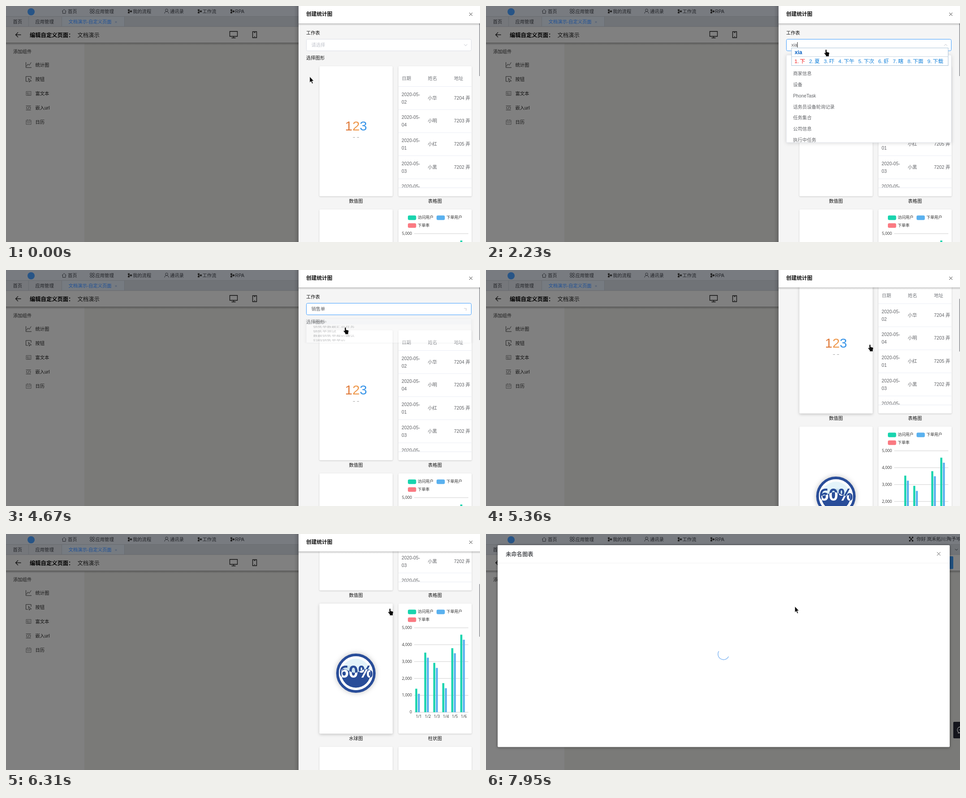
Animation of 1058x529 px, one loop 8000 ms. Source, as an HTML page:

```html
<!DOCTYPE html>
<html lang="zh-CN">
<head>
<meta charset="utf-8">
<style>
  html, body { margin: 0; width: 100%; height: 100%; overflow: hidden; background: #777; }
  svg { display: block; width: 1058px; height: 529px; }
  text { font-family: "Liberation Sans", "Noto Sans CJK SC", "Noto Sans CJK", sans-serif; white-space: pre; }
  .axis text { font-family: "Open Sans", "Noto Sans CJK SC", "Noto Sans CJK", sans-serif; }
  .card { filter: drop-shadow(0 1px 1.5px rgba(0,0,0,.18)); }
  .card.hover { filter: drop-shadow(0 2px 3px rgba(0,0,0,.2)); }
  .popup { filter: drop-shadow(0 1px 4px rgba(0,0,0,.14)); }
</style>
</head>
<body>
<svg id="stage" viewBox="0 0 1058 529"></svg>
<script>
const LOOP = 8000;
const BODY = 10.3;
const BLUE = '#294d99';

const text = (x, mid, s, { size = BODY, fill = '#111', weight = 400, anchor = 'start', extra = '' } = {}) =>
  `<text x="${x}" y="${mid + size * 0.37}" font-size="${size}" fill="${fill}" font-weight="${weight}" text-anchor="${anchor}" ${extra}>${s}</text>`;
const rect = (x, y, w, h, fill, extra = '') =>
  `<rect x="${x}" y="${y}" width="${w}" height="${h}" fill="${fill}" ${extra}/>`;
const line = (d, stroke = '#222', width = 1) =>
  `<path d="${d}" fill="none" stroke="${stroke}" stroke-width="${width}"/>`;
const ring = (x, y, r, stroke, width = 0.9) =>
  `<circle cx="${x}" cy="${y}" r="${r}" fill="none" stroke="${stroke}" stroke-width="${width}"/>`;
const cross = (x, y, r, color, width = 1) =>
  line(`M${x - r} ${y - r}l${2 * r} ${2 * r}m0 ${-2 * r}l${-2 * r} ${2 * r}`, color, width);

// Last key whose time has passed
const held = (keys, t) => keys.reduce((last, key) => (key[0] <= t ? key : last), keys[0]);
const ease = p => p * p * (3 - 2 * p);

function flowIcon(x) {
  return rect(x, 7.5, 4, 3.5, '#222') + rect(x, 13, 4, 3.5, '#222') +
    `<circle cx="${x + 7}" cy="12" r="2.2" fill="#222"/>` + line(`M${x + 2} 10v4M${x + 2} 12h5`);
}

function navBar() {
  const ink = '#202226';
  const items = [[138, '首页'], [199.5, '应用管理'], [283, '我的流程'], [366, '通讯录'], [438.5, '工作流'], [511.5, 'RPA']];
  return rect(0, 0, 1058, 24, '#787b80') +
    rect(0, 24, 1058, 22, '#707377') +
    rect(0, 24, 124, 22, '#75777b') + rect(125, 24, 139, 22, '#767b81') +
    line('M0 23.5H1058M0 46H1058M50.5 24V46M124.5 24V46M264.5 24V46', '#686b70') +
    '<circle cx="56" cy="13" r="8" fill="#275486"/>' +
    line('M125 12l4.7-4.5 4.7 4.5M126.5 11v5.5h6.4V11', ink, 0.9) +
    [[189.7, 9], [195.2, 9], [189.7, 14.5], [195.2, 14.5]].map(([x, y]) => ring(x, y, 2.2, ink)).join('') +
    [272, 428, 501].map(flowIcon).join('') +
    ring(358.5, 9.5, 2.8, ink) + line('M354 16.7q0-4.2 4.5-4.2t4.5 4.2', ink, 0.9) +
    items.map(([x, s]) => text(x, 11.7, s, { fill: ink })).join('') +
    line('M945 7l8 9M953 7l-8 9M945 9.5V7h2.5M950.5 7H953v2.5M953 13.5V16h-2.5M947.5 16H945v-2.5', '#111', 1.3) +
    text(961, 11.5, '你好 岚禾拓川:陶予岑', { fill: ink }) +
    text(15.5, 35, '首页', { fill: ink }) + text(65.5, 35, '应用管理', { fill: ink }) +
    text(139.5, 35, '文档演示-自定义页面', { fill: '#1d4f96' }) + cross(245.5, 36, 2, '#3f5570', 0.8) +
    line('M1033 31q3 4 0 8M1047 33.5l3 3 3-3', ink);
}

function sidebar() {
  const tools = ['统计图', '按钮', '富文本', '嵌入url', '日历'];
  return text(16, 102.5, '添加组件', { fill: '#1a1a1a' }) +
    line('M44.5 126v12h12.5M46 135l3-5 2.7 3 4.5-6.5') +
    line('M49 169h-4.5v-11h11.5v5M50 162l6.5 6-3 .3-1.5 2.5z') +
    line('M45 191.5h11v9H45zM47 194h3v3h-3zM52 194h2.5M52 196.5h2.5M47 199h7.5', '#484848') +
    line('M44.5 224h11M44.5 233h11M47.5 226.5l-2.5 2 2.5 2M53 226.5l2.5 2-2.5 2M51.5 226l-2.5 5') +
    line('M45 256h11v9.5H45zM45 259h11M48 254v3M53 254v3M47 262h7', '#444', 0.9) +
    tools.map((s, i) => text(65.5, 132 + 32 * i, s)).join('');
}

function page() {
  return rect(0, 0, 1058, 529, '#7a7a78') + rect(0, 84, 175, 445, '#808080') + navBar() +
    rect(0, 47, 1058, 35, '#808080') + rect(0, 82, 1058, 6, 'url(#dimShade)') +
    rect(960, 50, 83, 28.5, '#20507f', 'rx="2"') +
    line('M33.5 64.5H21.5M27 59l-5.5 5.5 5.5 5.5', '#111', 1.3) +
    text(53, 65, '编辑自定义页面：', { size: 12.3, weight: 700, fill: '#000' }) +
    text(159.5, 65, '文档演示', { size: 12.3 }) +
    line('M499.5 57h17v11h-17zM508 68v3M503.5 71.5h9', '#111', 1.3) +
    line('M550.5 57.5h9v13.5h-9zM553.5 59.5h3M554 68.7h2', '#111', 1.3) +
    sidebar() +
    rect(1043, 421, 20, 37, '#14151c', 'rx="2"') +
    ring(1058.5, 439, 6.5, '#8b8b8b', 1.3) + line('M1055.5 439h2M1053 446h4', '#8b8b8b', 1.3);
}

const card = (x, y, id, inner) =>
  rect(x, y, 163.5, 291.5, '#fff', `rx="2" class="card" id="${id}"`) + inner;

function numberCard() {
  const digits = [['1', '#e07a3a'], ['2', '#ef994c'], ['3', '#3995e8']];
  return digits.map(([s, fill], i) =>
    `<text x="${756.8 + i * 16.35}" y="279" font-size="29.4" fill="${fill}">${s}</text>`).join('') +
    line('M774.5 294.5h4.5M783.5 294.5h4.5', '#a3a3a3', 1.2);
}

function tableCard() {
  const rows = [['02', '小华', '7204 弄'], ['04', '小明', '7203 弄'], ['01', '小红', '7205 弄'], ['03', '小黑', '7202 弄']];
  const soft = { fill: '#606266' }, head = { fill: '#74777c', weight: 500 };
  const top = i => 180.5 + 51.7 * i;
  return ['日期', '姓名', '地址'].map((s, i) => text(883.5 + 58.2 * i, 162.5, s, head)).join('') +
    rows.map(([day, name, place], i) =>
      text(883, top(i) + 17.3, '2020-05-', soft) + text(883, top(i) + 34.3, day, soft) +
      text(941.5, top(i) + 25.3, name, soft) + text(1000, top(i) + 25.3, place, soft)).join('') +
    `<g clip-path="url(#tableClip)">${text(883, top(4) + 17.3, '2020-05-', soft)}</g>` +
    [0, 1, 2, 3, 4].map(i => line(`M876 ${top(i)}H1039`, '#ebeef5')).join('') + line('M876 407.5H1039', '#e8ebf1');
}

function barCard() {
  const visits = [1393, 3530, 2923, 1723, 3792, 4593];
  const base = 699.5, unit = 37.85 / 1000;
  const bar = (x, v, fill) => rect(x, base - v * unit, 4.5, v * unit, fill);
  const legend = [[897, 474.5, '#19d4ae', '访问用户'], [961, 474.5, '#5ab1ef', '下单用户'], [897, 492, '#fa7a82', '下单率']];
  const small = { size: 8.8, fill: '#333' };
  return '<g class="axis">' +
    legend.map(([x, y, fill, s]) => rect(x, y - 5, 18.5, 10.3, fill, 'rx="3"') + text(x + 22, y - 0.5, s, small)).join('') +
    [0, 1, 2, 3, 4, 5].map(k => {
      const y = base - k * 1000 * unit;
      return line(`M911 ${y}H1032`, '#cfcfcf') + text(906, y - 0.5, k ? `${k},000` : '0', { ...small, anchor: 'end' });
    }).join('') +
    visits.map((v, i) => {
      const x = 913.5 + 20.1 * i;
      return bar(x, v, '#19d4ae') + bar(x + 5.7, v - 300, '#5ab1ef') +
        text(x + 8, 708.5, `1/${i + 1}`, { ...small, anchor: 'middle' });
    }).join('') + '</g>';
}

function liquidCard() {
  const label = fill => `<text x="781.5" y="622" text-anchor="middle" font-size="36.75" font-weight="700" fill="${fill}">60%</text>`;
  return `<g class="axis"><circle cx="781" cy="612" r="41" fill="#fff" stroke="${BLUE}" stroke-width="6" style="filter:drop-shadow(0 0 6px rgba(0,0,0,.25))"/>
    <circle cx="781" cy="612" r="38" fill="#fff"/><circle cx="781" cy="612" r="32.5" fill="#e3f3fa"/>
    <g clip-path="url(#bowl)"><path id="backWave" fill="#c3ddea" opacity=".7"/></g>
    ${label(BLUE)}
    <g clip-path="url(#bowl)"><path id="frontWave" fill="${BLUE}"/>
    <g clip-path="url(#waveClip)">${label('#fff')}</g></g></g>`;
}

function drawer() {
  const titles = [[781, 437, '数值图'], [957.5, 437, '表格图'], [781, 758, '水球图'], [957.5, 758, '柱状图']];
  return rect(643, 0, 10, 529, 'url(#sideShade)') +
    rect(653, 0, 405, 529, '#f5f5f5') +
    `<g clip-path="url(#bodyClip)"><g id="content">
      ${text(670, 60.5, '工作表')}
      ${rect(670.5, 74.5, 368, 26, '#fff', 'rx="3" id="field"')}
      ${text(681.5, 87.5, '', { extra: 'id="query"' })}
      <path id="caret" stroke="#222"/>
      <path id="chevron" d="M-3.5 -1.8L0 1.8L3.5 -1.8" fill="none" stroke="#c0c4cc"/>
      ${text(670, 116.5, '选择图形')}
      ${card(699.5, 135, 'cardA', numberCard())}${card(876, 135, 'cardB', tableCard())}
      ${card(699.5, 456, 'cardC', liquidCard())}${card(876, 456, 'cardD', barCard())}
      ${card(699.5, 777, 'cardE', '')}${card(876, 777, 'cardF', '')}
      ${titles.map(([x, y, s]) => text(x, y, s, { anchor: 'middle' })).join('')}
    </g></g>` +
    rect(1056.3, 39, 2, 118, '#999b9f', 'id="thumb"') +
    rect(653, 39, 405, 5, 'url(#shade)') + rect(653, 0, 405, 39, '#fff') +
    text(670, 17.5, '创建统计图', { size: 11.7, weight: 700 }) + cross(1037.5, 18.5, 3.5, '#333') +
    '<g id="popup" class="popup"></g><g id="ime"></g>';
}

function dialog() {
  return rect(26, 25, 1009, 452.5, '#fff', 'rx="2" style="filter:drop-shadow(0 1px 3px rgba(0,0,0,.4))"') +
    text(44, 45, '未命名图表', { size: 12.3, weight: 700, fill: '#54565a' }) + cross(1010.5, 44.5, 3.8, '#555') +
    `<g id="rule">${rect(26, 64, 1009, 1, '#ccc')}${rect(26, 65, 1009, 3, 'url(#shade)')}</g>
     <circle id="spinner" r="12.35" fill="none" stroke="#82b7f2" stroke-width="1.4" pathLength="125.7"/>`;
}

const gradient = (id, dir, a, b) =>
  `<linearGradient id="${id}" ${dir}><stop stop-opacity="${a}"/><stop offset="1" stop-opacity="${b}"/></linearGradient>`;
const clip = (id, shape) => `<clipPath id="${id}">${shape}</clipPath>`;
const down = 'x2="0" y2="1"';

document.getElementById('stage').innerHTML =
  `<defs>${gradient('shade', down, 0.22, 0)}${gradient('dimShade', down, 0.28, 0)}${gradient('sideShade', '', 0, 0.16)}
   ${clip('bodyClip', rect(653, 39, 405, 490, '#000'))}${clip('tableClip', rect(876, 388, 163, 19, '#000'))}
   ${clip('bowl', '<circle cx="781" cy="612" r="32.5"/>')}${clip('waveClip', '<path id="waveMask"/>')}
   ${clip('listClip', rect(670, 0, 369, 195, '#000'))}</defs>
   ${page()}<g id="drawer">${drawer()}</g><g id="dialog">${dialog()}</g>
   <g id="cursor" fill="#0a0a0a" stroke="#fff" stroke-width=".5">
   <path id="arrow" d="M0 0V13L3 10.3L5.2 15.6L7.2 14.7L5 9.5H8.8Z"/>
   <path id="hand" d="M1.5 0Q3 0 3 2V5.5L7.5 6.5Q9.2 7 8.8 9L8 12V15.5H1V13L-2.6 8.8Q-2.8 6.9 -1.2 7.2L0 8.4V2Q0 0 1.5 0Z"/></g>`;

const ui = {};
document.querySelectorAll('[id]').forEach(el => { ui[el.id] = el; });
const set = (id, attrs) => { for (const k in attrs) ui[id].setAttribute(k, attrs[k]); };
const show = (id, on) => { ui[id].style.display = on ? '' : 'none'; };

const pointer = [
  [0, 678, 158.5], [70, 632, 161], [220, 629, 161], [300, 636, 158], [390, 660, 148], [470, 694, 130],
  [550, 724, 114], [630, 746, 104], [720, 756, 99], [920, 757.5, 97.5],
  [4100, 758, 103], [4180, 758, 113], [4260, 757, 123], [4350, 756, 128.5],
  [4830, 768, 135], [4910, 800, 148], [4990, 835, 160], [5070, 855.5, 167],
  [6380, 862, 173], [6450, 880, 188], [6520, 898, 205], [6590, 909, 215], [6670, 911, 217],
  [6820, 945, 281], [6900, 941, 278], [6980, 933, 272], [7060, 925, 266], [7140, 923, 265],
  [7690, 868, 238], [7780, 780, 201], [7860, 716, 173], [7950, 689.5, 162.5]
];
const scrolling = [[0, 0], [5130, 30], [5210, 75], [5290, 105], [5370, 150], [5440, 170], [5520, 200], [5600, 220],
  [5660, 225], [5740, 250], [5820, 285], [5900, 300]];
const opening = [[0, 0], [1300, 0.433], [1400, 0.8], [1460, 0.94], [1530, 0.99], [1680, 1], [4670, 0.41], [4750, 0.12], [4830, 0]];
const turning = [[0, 0], [1300, -50], [1400, -145], [1460, -180], [4670, -130], [4750, -40], [4830, 0]];
const typing = [[0, ''], [1840, 'x'], [2150, 'xi'], [2230, 'xia'], [2310, 'xiao'], [2400, "xiao's"], [2480, "xiao'sh"],
  [2630, "xiao'sho"], [2710, "xiao'shou"], [2870, "xiao'shou'd"], [3030, "xiao'shou'da"], [3190, "xiao'shou'dan"], [3250, '']];
const candidates = {
  x: '想 下 小 先 写 学 现在 谢谢 学习', xi: '系 西 洗 喜欢 细 戏 希望 系统 习惯', xia: '下 夏 吓 下午 下次 虾 瞎 下面 下载',
  xiao: '小 笑 校 效 消 销 晓 小心 效果', s: '销售 小时 小声 小事 消失 小 笑 消 校', sho: '销售 小手 消瘦 小受 消受 小 笑 消 校',
  d: '销售的 销售点 销售单 销售 小手 小受 消瘦 小 笑', da: '销售达 销售大 肖守达 销售 小受 小手 消瘦 小 笑',
  dan: '销售单 销售 小手 小受 消瘦 消受 小 笑 消'
};
const allSheets = ['客户表', '商家信息', '设备', 'PhoneTask', '话务员设备轮询记录', '任务集合', '公司信息', '执行中任务'];
const found = ['销售单', '销售单数据汇总任务', '销售单测试', '数据销售单报价确认', '归档销售单单价'];

let popupKey, imeKey;

function drawPopup(t) {
  const scale = held(opening, t)[1];
  show('popup', scale > 0);
  const filtered = t >= 3430, hovered = t >= 4260;
  const key = `${filtered}${hovered}`;
  if (key !== popupKey) {
    popupKey = key;
    ui.popup.innerHTML = rect(670.5, 0, 368, filtered ? 130 : 196, '#fff', 'rx="2" stroke="#e4e7ed"') +
      (hovered ? rect(671, 4.4, 367, 24.8, '#f3f6fa') : '') +
      '<g clip-path="url(#listClip)">' + (filtered ? found : allSheets).map((s, i) =>
        text(685.5, 16.9 + 24.75 * i, s, { fill: '#606266' })).join('') + '</g>';
  }
  set('popup', { transform: `translate(0 110) scale(1 ${scale})`, opacity: scale });
}

function drawIme(pinyin) {
  show('ime', pinyin);
  if (!pinyin || pinyin === imeKey) return;
  imeKey = pinyin;
  const last = pinyin.split("'").pop();
  const words = (candidates[last] || candidates[last.startsWith('sho') ? 'sho' : 's']).split(' ');
  let x = 688.5;
  const row = words.map((word, i) => {
    const style = { size: 11.8, fill: i ? '#1583dc' : '#f01818' };
    const out = text(x, 123.5, `${i + 1}.`, style) + text(x + 12, 123.5, word, style);
    x += 21 + word.length * 11.7;
    return out;
  }).join('');
  ui.ime.innerHTML = rect(682, 94, x - 680, 39.5, '#fff', 'stroke="#a9c3d8"') +
    line(`M682 113.5H${x + 2}`, '#c9d6e0') +
    text(689, 103.8, pinyin, { size: 12.1, weight: 700, fill: '#0a62c4' }) + row;
}

function drawField(t, pinyin) {
  const chosen = t >= 3250, empty = !pinyin && !chosen;
  const value = chosen ? '销售单' : pinyin.replace(/'/g, '') || '请选择';
  if (ui.query.textContent !== value) ui.query.textContent = value;
  set('query', { fill: empty ? '#c0c4cc' : '#606266' });
  set('field', { stroke: t >= 1400 ? '#409eff' : t >= 920 ? '#b7c1d3' : '#dcdfe6' });
  const caretX = empty ? 682.5 : chosen ? 712.5 : 682 + ui.query.getComputedTextLength();
  set('caret', { d: `M${caretX} 81V93` });
  show('caret', t >= 1300 && t < 3890 || t >= 4350 && t < 4500);
  set('chevron', { transform: `translate(1026 87.5) rotate(${held(turning, t)[1]})` });
}

function wave(phase, level, amp) {
  let d = 'M743 650';
  for (let x = 743; x <= 819; x += 2) d += `L${x} ${(level + amp * Math.sin(x / 8.2 + phase)).toFixed(2)}`;
  return d + 'L819 650Z';
}

function drawLiquid(t) {
  const front = wave(t / 320, 607, 4);
  set('frontWave', { d: front });
  set('waveMask', { d: front });
  set('backWave', { d: wave(2.5 + t / 400, 600, 5) });
}

function drawDialog(t) {
  show('dialog', t >= 6820);
  set('rule', { opacity: Math.max(0.12, Math.min(1, 1 - (t - 6880) / 250)) });
  const age = t - 6953;
  show('spinner', age > 0);
  const phase = Math.max(0, age) % 1500 / 750;
  const grow = ease(Math.min(1, phase)), slide = ease(Math.max(0, phase - 1));
  set('spinner', {
    transform: `translate(530.2 269.3) rotate(${age * 0.18 + 32.5})`,
    'stroke-dasharray': `${1 + 89 * grow} 200`,
    'stroke-dashoffset': -40 * grow - 80 * slide,
    opacity: Math.min(1, Math.max(0, age / 250))
  });
}

function draw(t) {
  const [, x, y] = held(pointer, t);
  const pointing = t >= 920 && t < 6820;
  set('cursor', { transform: `translate(${x} ${y})` });
  show('arrow', !pointing);
  show('hand', pointing);

  show('drawer', t < 6820);
  const scroll = held(scrolling, t)[1];
  set('content', { transform: `translate(0 ${-scroll})` });
  set('thumb', { y: 39 + scroll * 0.244 });
  const over = (left, top) => t >= 4830 && x > left && x < left + 163 && y + scroll > top && y + scroll < top + 291;
  [['cardA', 699, 135], ['cardB', 876, 135], ['cardC', 699, 456], ['cardD', 876, 456]].forEach(([id, left, top]) =>
    ui[id].classList.toggle('hover', over(left, top)));

  const pinyin = held(typing, t)[1];
  drawField(t, pinyin);
  drawPopup(t);
  drawIme(pinyin);
  drawLiquid(t);
  drawDialog(t);
}

const start = performance.now();
function tick(now) {
  draw(Math.max(0, now - start) % LOOP);
  requestAnimationFrame(tick);
}
draw(0);
requestAnimationFrame(tick);
</script>
</body>
</html>
```
